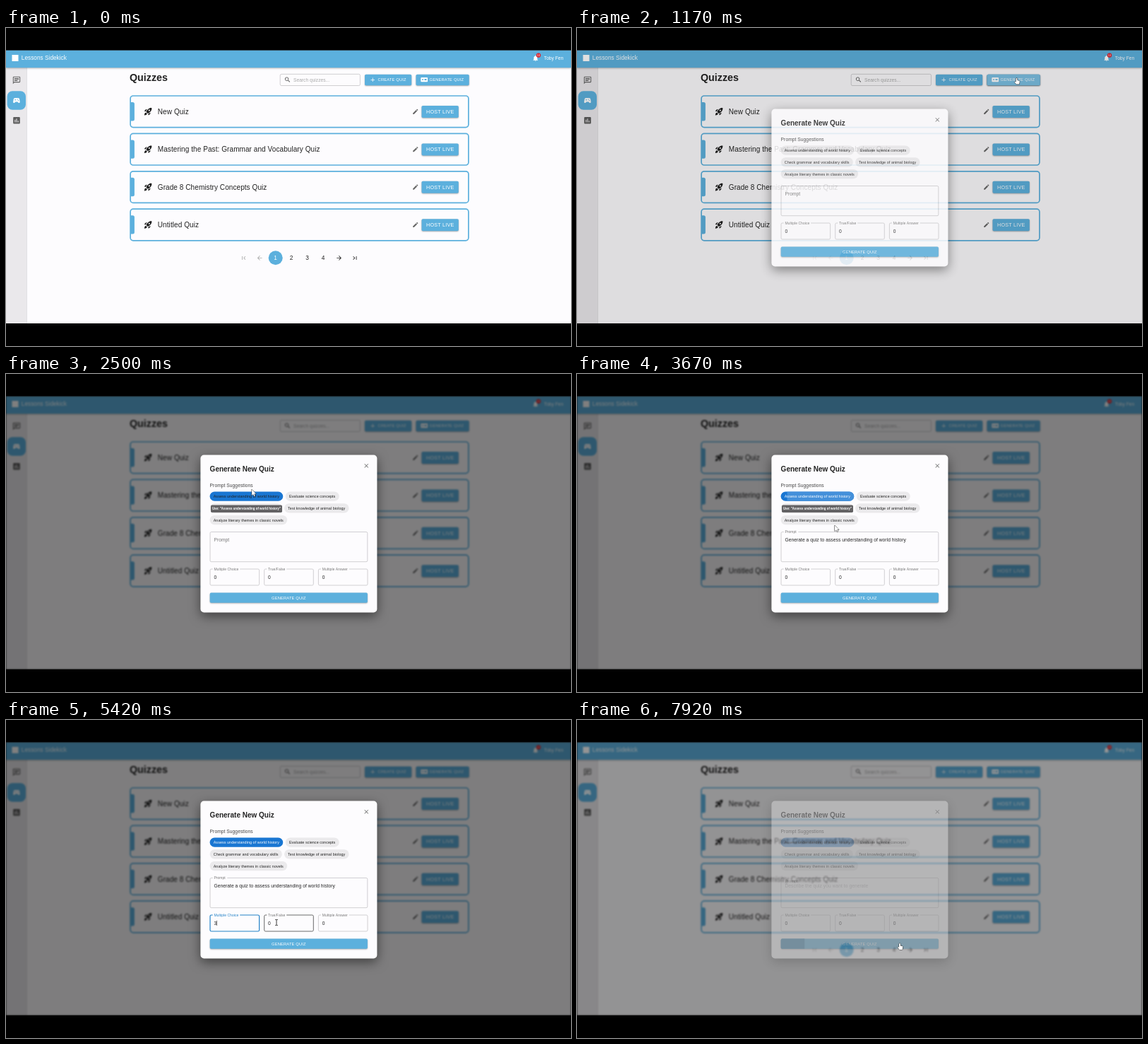
Write an HTML page with a canvas that moves like this. It is 800 by 450 pixels and loops after 8000 ms.

```html
<!DOCTYPE html>
<html lang="en">
<head>
<meta charset="utf-8">
<title>Quiz generator</title>
<style>
  html, body { margin: 0; width: 100%; height: 100%; overflow: hidden; background: #000; }
  canvas { display: block; width: 800px; height: 450px; }
</style>
</head>
<body>
<canvas id="stage"></canvas>
<script>
const W = 800, H = 450, LOOP = 8000, FPS = 12;
const TOP = 31.5, BOTTOM = 418;
const BLUE = '#5cb0dd', PAPER = '#fdfcfe', INK = '#222', PRIMARY = '#1976d2';
const SANS = '"Liberation Sans", Arial, sans-serif';
const ratio = window.devicePixelRatio || 1;

const ICONS = {
  edit: 'M3 17.25V21h3.75L17.81 9.94l-3.75-3.75zM20.71 7.04c.39-.39.39-1.02 0-1.41l-2.34-2.34c-.39-.39-1.02-.39-1.41 0l-1.83 1.83 3.75 3.75z',
  search: 'M15.5 14h-.8l-.3-.3A6.5 6.5 0 1 0 13.7 14.4l.3.3v.8l5 5L20.5 19zM9.5 14a4.5 4.5 0 1 1 0-9 4.5 4.5 0 0 1 0 9z',
  add: 'M19 13h-6v6h-2v-6H5v-2h6V5h2v6h6z',
  close: 'M19 6.4 17.6 5 12 10.6 6.4 5 5 6.4 10.6 12 5 17.6 6.4 19 12 13.4 17.6 19 19 17.6 13.4 12z',
  first: 'M18.4 16.6 13.8 12l4.6-4.6L17 6l-6 6 6 6zM6 6h2v12H6z',
  last: 'M5.6 7.4 10.2 12l-4.6 4.6L7 18l6-6-6-6zM16 6h2v12h-2z',
  back: 'M20 11H7.8l5.6-5.6L12 4l-8 8 8 8 1.4-1.4L7.8 13H20z',
  next: 'M4 11h12.2l-5.6-5.6L12 4l8 8-8 8-1.4-1.4 5.6-5.6H4z',
  bell: 'M12 22a2 2 0 0 0 2-2h-4a2 2 0 0 0 2 2zM18 16v-5c0-3.1-1.6-5.6-4.5-6.3V4a1.5 1.5 0 0 0-3 0v.7C7.6 5.4 6 7.9 6 11v5l-2 2v1h16v-1z',
  chat: 'M4 2a2 2 0 0 0-2 2v18l4-4h14a2 2 0 0 0 2-2V4a2 2 0 0 0-2-2zM4 4h16v12H5.2L4 17.2zM6 12h8v2H6zM6 9h12v2H6zM6 6h12v2H6z',
  chart: 'M5 3a2 2 0 0 0-2 2v14a2 2 0 0 0 2 2h14a2 2 0 0 0 2-2V5a2 2 0 0 0-2-2zM7 10h2v7H7zM11 7h2v10h-2zM15 13h2v4h-2z',
  game: 'M21.6 16.1l-1.1-7.7A4 4 0 0 0 16.5 5h-9a4 4 0 0 0-4 3.4l-1.1 7.7A2.6 2.6 0 0 0 6.7 18.2L9 16h6l2.2 2.2a2.6 2.6 0 0 0 4.4-2.1zM11 11H9v2H8v-2H6v-1h2V8h1v2h2zM14 8h2v2h-2zM16 11h2v2h-2z',
  rocket: 'M9.2 6.4C7.2 8.6 5.8 11.9 5.6 12.2L2 10.7 6 6.6a2 2 0 0 1 1.8-.5zM11.2 17s3.7-1.5 5.9-3.7c5.4-5.4 4.5-9.6 4.2-10.6-1-.3-5.2-1.2-10.6 4.2C8.6 9.1 7 12.8 7 12.8zM17.7 14.8c-2.3 2-5.6 3.4-5.9 3.6l1.5 3.6 4.1-4a2 2 0 0 0 .5-1.8zM9 18a3 3 0 0 1-.9 2.1C6.9 21.3 2 22 2 22s.7-4.9 1.9-6.1A3 3 0 0 1 9 18zM13 9a2 2 0 1 0 4 0 2 2 0 1 0-4 0z'
};
for (const name in ICONS) ICONS[name] = new Path2D(ICONS[name]);

const ARROW = new Path2D('M0 0V8.4L2 6.6 3.3 9.5 4.7 8.9 3.4 6.1H6.1z');
const HAND = new Path2D('M-.9.2Q0-.8.9.2V3.1L3.6 3.8Q4.5 4.1 4.3 5L3.7 8.6H-.4L-3 5.4Q-2.8 4.2-.9 5.3z');
const BEAM = new Path2D('M-1.8-4H-.5L0-3.6.5-4H1.8M0-3.6V3.6M-1.8 4H-.5L0 3.6.5 4H1.8');

function layer(canvas) {
  canvas.width = W * ratio;
  canvas.height = H * ratio;
  const ctx = canvas.getContext('2d');
  ctx.scale(ratio, ratio);
  return ctx;
}
const main = layer(document.getElementById('stage'));
const page = layer(document.createElement('canvas'));
const dialog = layer(document.createElement('canvas'));

// Drawing helpers
function box(c, x, y, w, h, r, fill) {
  c.beginPath();
  c.roundRect(x, y, w, h, r);
  c.fillStyle = fill;
  c.fill();
}
function shadow(c, color, blur, dy) {
  c.shadowColor = color;
  c.shadowBlur = blur * ratio;
  c.shadowOffsetY = dy * ratio;
}
function text(c, str, x, y, size, color, { bold = false, align = 'left', track = 0.0094 } = {}) {
  c.font = `${bold ? 'bold ' : ''}${size}px ${SANS}`;
  c.letterSpacing = `${track * size}px`;
  c.textAlign = align;
  c.fillStyle = color;
  c.fillText(str, x, y);
  return c.measureText(str).width;
}
function icon(c, name, x, y, size, color) {
  c.save();
  c.translate(x - size / 2, y - size / 2);
  c.scale(size / 24, size / 24);
  c.fillStyle = color;
  c.fill(ICONS[name], 'evenodd');
  c.restore();
}
function button(c, x, y, w, h, fill = BLUE) {
  c.save();
  shadow(c, 'rgba(0,0,0,.35)', 2, 0.8);
  box(c, x, y, w, h, 1.8, fill);
  c.restore();
}

// Timing helpers
const clamp = v => Math.max(0, Math.min(1, v));
const smooth = v => v * v * (3 - 2 * v);
const ramp = (t, from, to) => clamp((t - from) / (to - from));
const within = (t, from, to) => t >= from && t < to;
function track(t, keys, ease = v => v) {
  let i = 1;
  while (i < keys.length - 1 && t >= keys[i][0]) i++;
  const a = keys[i - 1], b = keys[i], k = ease(ramp(t, a[0], b[0]));
  return a.slice(1).map((v, j) => v + (b[j + 1] - v) * k);
}
function mix(a, b, k) {
  const part = (s, i) => parseInt(s.slice(i, i + 2), 16);
  return `rgb(${[1, 3, 5].map(i => Math.round(part(a, i) + (part(b, i) - part(a, i)) * k))})`;
}

const CAPS = { track: 0.0286 };

function generateButton(c, fill) {
  button(c, 580.5, 65.8, 75.2, 15.4, fill);
  box(c, 587.3, 70, 9.8, 6.2, 1, '#fff');
  box(c, 589, 72, 2, 2, 1, fill);
  box(c, 592.5, 72, 3, 2, 0.5, fill);
  text(c, 'GENERATE QUIZ', 599.6, 75.3, 5.76, '#fff', CAPS);
}

function drawRow(c, title, i) {
  const y = 95.2 + 53.4 * i, mid = y + 23;
  c.beginPath();
  c.roundRect(176.1, y + 0.8, 478.8, 44.6, 4);
  c.strokeStyle = BLUE;
  c.lineWidth = 1.7;
  c.stroke();
  box(c, 176.5, mid - 13.2, 5.4, 26.4, [0, 2.5, 2.5, 0], BLUE);
  icon(c, 'rocket', 201.2, mid, 13, '#1d1d1d');
  text(c, title, 214.8, mid + 3.5, 10, INK, { track: 0.0075 });
  icon(c, 'edit', 579.8, mid + 0.1, 9.6, '#666');
  button(c, 588.5, mid - 8.2, 52.3, 17);
  text(c, 'HOST LIVE', 614.8, mid + 2.8, 7.2, '#fff', { align: 'center', track: 0.0286 });
}

function drawPage(c) {
  c.fillStyle = PAPER;
  c.fillRect(0, TOP, W, BOTTOM - TOP);
  c.fillStyle = '#eae8eb';
  c.fillRect(0, 50, 29.5, BOTTOM - 50);
  c.fillStyle = '#d8d6d9';
  c.fillRect(29.2, 50, 0.6, BOTTOM - 50);

  c.save();
  shadow(c, 'rgba(0,0,0,.4)', 3, 1);
  c.fillStyle = BLUE;
  c.fillRect(0, TOP, W, 24.7);
  c.restore();
  c.fillStyle = '#fff';
  c.fillRect(8.5, 38, 9, 9);
  text(c, 'Lessons Sidekick', 21.8, 45.4, 8.3, '#fff', { track: 0 });
  icon(c, 'bell', 749.8, 42.8, 10, '#fff');
  box(c, 750.8, 35.4, 6.4, 6.4, 3.2, '#d8232f');
  text(c, '10', 754, 40, 3.8, '#fff', { align: 'center' });
  text(c, 'Toby Fen', 761.8, 44.6, 6.67, '#fff', { track: 0 });

  icon(c, 'chat', 15, 74, 12.5, '#666');
  box(c, 1.6, 89.2, 26.4, 26.6, 7.5, BLUE);
  icon(c, 'game', 14.9, 102.6, 12, '#fff');
  icon(c, 'chart', 15, 130.8, 12.8, '#5c5c5c');

  text(c, 'Quizzes', 175, 74.6, 14.3, INK, { bold: true, track: 0 });
  c.beginPath();
  c.roundRect(388.2, 65.3, 113.2, 16.2, 1.8);
  c.strokeStyle = '#c6c5c7';
  c.lineWidth = 0.8;
  c.stroke();
  icon(c, 'search', 398.6, 73.2, 10, '#555');
  text(c, 'Search quizzes...', 407, 75.6, 6.67, '#aaa', { track: 0 });
  button(c, 508, 65.8, 66.2, 15.4);
  icon(c, 'add', 519.2, 73.3, 9.5, '#fff');
  text(c, 'CREATE QUIZ', 526.6, 75.3, 5.76, '#fff', CAPS);
  generateButton(c, BLUE);

  ['New Quiz', 'Mastering the Past: Grammar and Vocabulary Quiz',
    'Grade 8 Chemistry Concepts Quiz', 'Untitled Quiz'].forEach((title, i) => drawRow(c, title, i));

  box(c, 371.7, 315.2, 20, 20, 10, BLUE);
  for (let n = 1; n < 5; n++) {
    text(c, String(n), 359.2 + 22.45 * n, 328.1, 8.3, n === 1 ? '#fff' : INK, { align: 'center', track: 0 });
  }
  icon(c, 'first', 336.6, 325.4, 10, '#aaa');
  icon(c, 'back', 359.2, 325.4, 10, '#aaa');
  icon(c, 'next', 471.6, 325.4, 10, INK);
  icon(c, 'last', 494, 325.4, 10, INK);
}

// Events of the scene, in ms
const PICK = 2420, FILL = 2750, CLOSE = 7820;
const CHIPS = [
  ['Assess understanding of world history', 288.6, 166.5],
  ['Evaluate science concepts', 395.8, 166.5],
  ['Check grammar and vocabulary skills', 288.6, 183.2],
  ['Test knowledge of animal biology', 394, 183.2],
  ['Analyze literary themes in classic novels', 288.6, 199.9]
];
const FIELDS = [
  { label: 'Multiple Choice', x: 289, value: '3', hover: 4250, focus: 4500, typed: 4910, blur: 5580 },
  { label: 'True/False', x: 365.7, value: '2', hover: 5330, focus: 5580, typed: 5910, blur: 6240 },
  { label: 'Multiple Answer', x: 442.4, value: '2', hover: 6080, focus: 6240, typed: 6410, blur: 6660 }
];
const CURSOR = [
  [0, 810, 260], [420, 722, 160], [750, 626, 73], [1166, 622.5, 71], [1333, 524.5, 110],
  [1667, 400, 160], [1917, 350, 172], [2250, 349, 171], [2500, 348, 163.5], [3000, 352, 180],
  [3666, 365, 214], [4000, 342, 245], [4330, 318, 287], [5080, 318, 287], [5416, 383, 286.5],
  [5750, 383, 286.5], [6080, 455, 287], [6410, 455, 287], [6660, 457, 316.3], [8000, 457, 316.3]
];

function outline(c, x, y, w, h, notch, color, width) {
  c.beginPath();
  c.roundRect(x, y, w, h, 1.8);
  c.strokeStyle = color;
  c.lineWidth = width;
  c.stroke();
  if (notch) {
    c.fillStyle = PAPER;
    c.fillRect(x + 3.7, y - 1, notch + 3.6, 2);
  }
}

function drawChips(c, t) {
  const picked = ramp(t, PICK - 60, PICK + 60) * (1 - 0.35 * ramp(t, CLOSE, CLOSE + 97));
  CHIPS.forEach(([label, x, y], i) => {
    c.font = `5.42px ${SANS}`;
    c.letterSpacing = `${0.0107 * 5.42}px`;
    const w = c.measureText(label).width + 10.4;
    const hot = i === 0 && within(t, 1830, PICK);
    let fill = hot ? '#d8d8d8' : '#ebeaec', color = INK;
    if (i === 0 && picked > 0) {
      fill = mix('#ebeaec', PRIMARY, picked);
      if (within(t, PICK + 140, CLOSE)) color = '#fff';
    }
    box(c, x, y, w, 13.3, 6.65, fill);
    if (i === 0 && within(t, 2580, 4330)) {
      c.save();
      c.beginPath();
      c.rect(x + 9, y, w, 14);
      c.clip();
      box(c, x, y, w, 13.3, 6.65, '#4490da');
      c.restore();
    }
    text(c, label, x + 5.1, y + 8.6, 5.42, color, { track: 0.0107 });
  });
  const tip = ramp(t, 1990, 2170) * (1 - ramp(t, 3910, 4080));
  if (tip) {
    c.globalAlpha = tip;
    box(c, 290, 185.4, 101, 10.6, 1.7, '#636264');
    text(c, 'Use: "Assess understanding of world history"', 340.5, 192.3, 4.45, '#fff',
      { bold: true, align: 'center', track: 0 });
    c.globalAlpha = 1;
  }
}

function drawPrompt(c, t) {
  const filled = within(t, FILL, CLOSE);
  const lift = smooth(ramp(t, FILL, FILL + 200)) * (1 - smooth(ramp(t, CLOSE, CLOSE + 240)));
  const over = within(t, 3740, 4230);
  outline(c, 289, 223.5, 222.8, 42.2, lift > 0.5 ? 17 : 0, over ? '#444' : '#c6c5c7', 0.8);
  text(c, 'Prompt', 294.4, 237.3 - 11.9 * lift, 6.67 - 1.67 * lift, '#777');
  if (filled) {
    text(c, 'Generate a quiz to assess understanding of world history', 294.4, 237.2, 6.67, INK);
  } else if (t >= CLOSE) {
    text(c, 'Describe the quiz you want to generate', 294.4, 237.2, 6.67, `rgba(0,0,0,${0.4 * lift})`);
  }
}

function drawField(c, t, f) {
  const active = within(t, f.focus, f.blur);
  const over = within(t, f.hover, f.focus);
  const color = active ? '#2583c8' : over ? '#444' : '#c6c5c7';
  c.font = `5px ${SANS}`;
  c.letterSpacing = '0.047px';
  outline(c, f.x, 276, 69.6, 23, c.measureText(f.label).width, color, active ? 1.2 : 0.8);
  text(c, f.label, f.x + 5.4, 277.5, 5, active ? '#2583c8' : '#777');
  const typed = within(t, f.typed, CLOSE);
  const w = text(c, typed ? f.value : '0', f.x + 5.4, 289.8, 6.67, INK);
  const since = t - (typed ? f.typed : f.focus);
  if (active && since % 1060 < 530) {
    c.fillStyle = INK;
    c.fillRect(f.x + 5.6 + w, 283.8, 0.6, 7.2);
  }
}

function drawDialog(c, t) {
  c.clearRect(0, 0, W, H);
  c.save();
  shadow(c, 'rgba(0,0,0,.5)', 16, 5);
  box(c, 275.4, 114.6, 250, 222.8, 5, PAPER);
  c.restore();
  text(c, 'Generate New Quiz', 288.6, 138.2, 10, INK, { bold: true, track: 0 });
  icon(c, 'close', 510.3, 129.8, 10, '#777');
  text(c, 'Prompt Suggestions', 288.6, 159.6, 6.67, '#444');
  drawChips(c, t);
  drawPrompt(c, t);
  FIELDS.forEach(f => drawField(c, t, f));
  button(c, 288.7, 309.6, 223.2, 14.2);
  if (t >= CLOSE) box(c, 288.7, 309.6, 33.6, 14.2, [1.8, 0, 0, 1.8], '#3a86b2');
  text(c, 'GENERATE QUIZ', 400.4, 318.8, 5.76, '#fff', { align: 'center', track: 0.0286 });
}

function drawCursor(c, t) {
  const [x, y] = track(t, CURSOR, smooth);
  c.save();
  c.translate(x, y);
  c.lineJoin = 'round';
  c.lineWidth = 0.9;
  if (within(t, 3990, 6480)) {
    c.strokeStyle = '#222';
    c.stroke(BEAM);
  } else {
    const hand = within(t, 740, 1240) || within(t, 1830, 2410) || t > 6570;
    const shape = hand ? HAND : ARROW;
    c.fillStyle = '#fff';
    c.strokeStyle = '#111';
    c.stroke(shape);
    c.fill(shape);
  }
  c.restore();
}

function draw(t) {
  const c = main;
  const dim = track(t, [[1000, 0], [1166, 0.12], [1333, 0.5], [CLOSE, 0.5], [7916, 0.42], [8000, 0.3]])[0];
  const shown = track(t, [[1000, 0], [1166, 0.84], [1250, 1], [CLOSE, 1], [7916, 0.33], [8000, 0]])[0];

  c.fillStyle = '#000';
  c.fillRect(0, 0, W, H);
  const blur = dim > 0.15 ? 2 * dim * ratio : 0;
  c.filter = blur ? `blur(${blur}px)` : 'none';
  c.drawImage(page.canvas, 0, 0, W, H);
  c.filter = 'none';
  if (within(t, 740, 1240)) generateButton(c, '#7cc0e4');

  c.fillStyle = `rgba(0,0,0,${dim})`;
  c.fillRect(0, TOP, W, BOTTOM - TOP);
  c.fillStyle = '#000';
  c.fillRect(0, 0, W, TOP);
  c.fillRect(0, BOTTOM, W, H - BOTTOM);

  if (shown > 0) {
    drawDialog(dialog, t);
    c.globalAlpha = shown;
    c.drawImage(dialog.canvas, 0, 0, W, H);
    c.globalAlpha = 1;
  }
  drawCursor(c, t);
}

drawPage(page);
const start = performance.now();
function tick() {
  const t = (performance.now() - start) % LOOP;
  draw(Math.floor((t + 4) * FPS / 1000) % (LOOP * FPS / 1000) * 1000 / FPS);
  requestAnimationFrame(tick);
}
tick();
</script>
</body>
</html>
```
